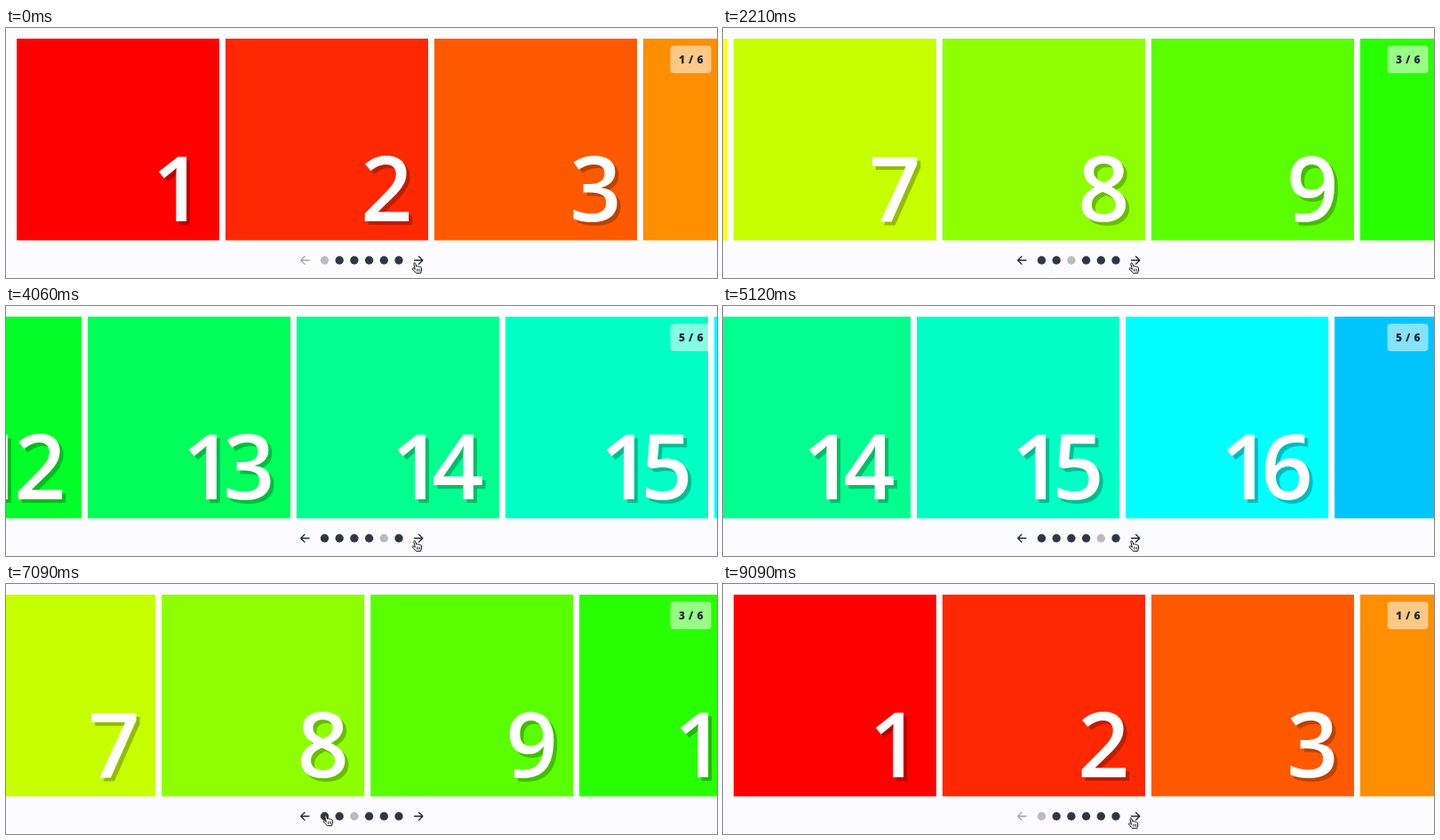
Write an HTML page that moves like this. It is 800x282 px and loops after 9480 ms.

```html
<!DOCTYPE html>
<html lang="en">
<head>
<meta charset="utf-8">
<title>Carousel</title>
<style>
  html, body { margin: 0; width: 100%; height: 100%; overflow: hidden; background: #fcfcfe; }
  svg { display: block; width: 800px; height: 282px; }
  text { font-family: "Open Sans", "Noto Sans", sans-serif; }
  .num { font-size: 102px; font-weight: 560; letter-spacing: -12px; text-anchor: end; fill: #fff; }
  .shade { fill: #000; fill-opacity: .26; }
  .count { font-size: 12px; font-weight: 800; letter-spacing: .5px; text-anchor: middle; fill: #222b38; }
  .arrow { fill: none; stroke: #1f2937; stroke-width: 1.3; stroke-linecap: round; stroke-linejoin: round; }
</style>
</head>
<body>
<svg id="stage" viewBox="0 0 800 282">
  <g id="track"></g>
  <rect x="747.5" y="20" width="46" height="31" rx="4" fill="#fff" fill-opacity=".52"/>
  <text id="count" class="count" x="771" y="39.5"></text>
  <path id="prev" class="arrow" d="M341 262H331.8M336 257.7l-4.3 4.3 4.3 4.3"/>
  <g id="dots"></g>
  <path id="next" class="arrow" d="M459.5 262H468.8M464.6 257.7l4.3 4.3-4.3 4.3"/>
  <g id="hand" stroke-linecap="round" stroke-linejoin="round">
    <path fill="#fff" stroke="#111" d="M4 8.5L2.6 3C2.2 1.2 4 .8 4.5 2.4L5.4 5.6C6 4.8 7.2 5 7.4 5.8C8 5.2 9.1 5.4 9.3 6.2C10 5.8 11 6.2 11.1 7.2L11.3 9.6C11.3 11 10.5 11.8 10.3 13.2H5.3C5 12 2.5 10.6 1 8.6C.4 7.6 1.8 6.9 2.6 7.7Z"/>
    <path fill="none" stroke="#111" stroke-width=".7" d="M6.2 8.6v2.4M7.8 8.6v2.4M9.4 8.6v2.4"/>
  </g>
  <path id="pointer" fill="#111" stroke="#fff" stroke-width=".8" d="M0 0V10.6L2.4 8.4L4 12L5.8 11.2L4.2 7.7H7.6Z"/>
</svg>
<script>
const LOOP = 9480, CARDS = 18, PAGES = 6, PITCH = 235, SIZE = 228, PAD = 12;
const MAX = PAD * 2 + CARDS * PITCH - 8 - 800;
const OMEGA = Math.sqrt(250);   // critically damped spring, rad/s
const moves = [[290, 1], [1427, 2], [2670, 3], [3825, 4], [5030, 5], [6970, 0]];
// start, end, x, y of each cursor move
const glides = [
  [5630, 6550, 359.5, 260.5],
  [7950, 8880, 460, 265],
  [8910, 9090, 458.8, 263.5]
];
const home = [459.6, 264.4];

const $ = id => document.getElementById(id);
const add = (parent, tag, attrs, text = "") => {
  const el = document.createElementNS("http://www.w3.org/2000/svg", tag);
  for (const k in attrs) el.setAttribute(k, attrs[k]);
  el.textContent = text;
  parent.append(el);
  return el;
};
const place = (el, x, y) => el.setAttribute("transform", `translate(${x} ${y})`);

// Five cards per 60 degrees of the colour wheel
function cardColor(i) {
  const step = n => Math.round(255 * Math.pow(n / 5, 1.15));
  const sector = Math.floor(i / 5), k = i % 5;
  const up = step(k), down = step(5 - k);
  return `rgb(${[[255, up, 0], [down, 255, 0], [0, 255, up], [0, down, 255]][sector]})`;
}

for (let i = 0; i < CARDS; i++) {
  const x = PAD + i * PITCH, right = x + SIZE - 29.5;
  add($("track"), "rect", { x, y: 12, width: SIZE, height: 227.5, fill: cardColor(i) });
  add($("track"), "text", { class: "num shade", x: right + 4, y: 221.5 }, i + 1);
  add($("track"), "text", { class: "num", x: right, y: 217.5 }, i + 1);
}
const dotX = i => 358.5 + i * 16.7;
const dots = Array.from({ length: PAGES }, (_, i) =>
  add($("dots"), "circle", { cx: dotX(i), cy: 262, r: 4.7 }));

const pageLeft = p => Math.min(p * 3 * PITCH, MAX);

function scrollAt(t) {
  let from = 0, pos = 0;
  for (const [start, page] of moves) {
    if (t < start) break;
    const to = pageLeft(page), wt = OMEGA * (t - start) / 1000;
    const rest = (from - to) * (1 + wt) * Math.exp(-wt);
    pos = Math.abs(rest) < .3 ? to : to + rest;
    from = to;
  }
  return pos;
}

function cursorAt(t) {
  let [x, y] = home;
  for (const [start, end, tx, ty] of glides) {
    if (t < start) break;
    const p = Math.min(1, (t - start) / (end - start));
    const e = 1 - Math.pow(1 - p, 3);
    x += (tx - x) * e;
    y += (ty - y) * e;
  }
  return [x, y];
}

function nearestPage(pos) {
  let best = 0;
  for (let p = 1; p < PAGES; p++)
    if (Math.abs(pageLeft(p) - pos) < Math.abs(pageLeft(best) - pos)) best = p;
  return best;
}

function draw(t) {
  const pos = scrollAt(t), page = nearestPage(pos);
  place($("track"), -pos, 0);
  $("count").textContent = `${page + 1} / ${PAGES}`;
  dots.forEach((d, i) => d.setAttribute("fill", i === page ? "#bbbbbb" : "#2d3748"));
  $("prev").style.opacity = page === 0 ? .42 : 1;
  $("next").style.opacity = page === PAGES - 1 ? .42 : 1;

  const [x, y] = cursorAt(t);
  const over = x > 456 || dots.some((_, i) => Math.abs(x - dotX(i)) < 4.7);
  $("hand").style.display = over ? "" : "none";
  $("pointer").style.display = over ? "none" : "";
  place($("hand"), x - 3.3, y - 1);
  place($("pointer"), x, y);
}

const t0 = performance.now();
function tick() {
  draw((performance.now() - t0) % LOOP);
  requestAnimationFrame(tick);
}
tick();
</script>
</body>
</html>
```
